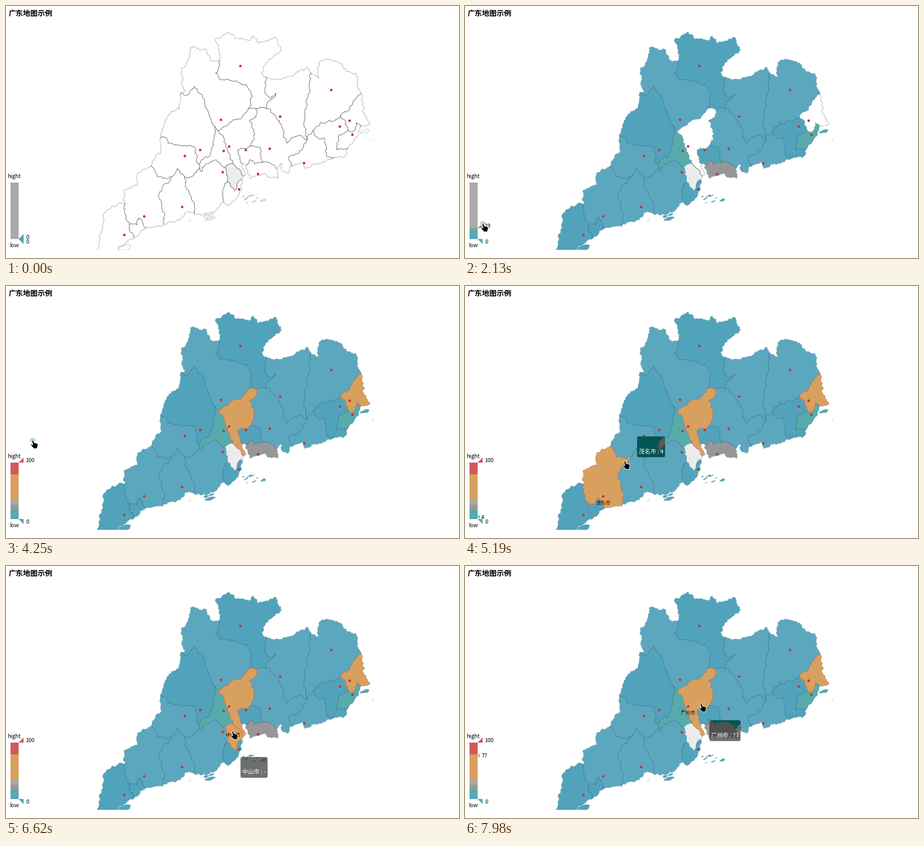
These frames come from a looping animation (1003 px wide and 558 px high, 8 s). A matplotlib script:

```python
import math
import numpy as np
import matplotlib.pyplot as plt
from matplotlib.animation import FuncAnimation
from matplotlib.patches import Circle, FancyBboxPatch, PathPatch, Polygon, Rectangle
from matplotlib.path import Path

W, H, DPI = 1003, 558, 64
PX = 72 / DPI
STEP, LOOP = 40, 8000
FONT = "Noto Sans CJK JP"
BAR_X, BAR_W, BAR_TOP, BAR_LOW = 10, 18, 391, 516
TIP_LAG = 150

# upper limit of each colour band on the 0-100 scale
BANDS = [(3, "#50a3bb"), (5, "#5ba7be"), (16, "#57abab"), (25, "#979797"),
         (34, "#a8a8a8"), (79, "#d8a05e"), (101, "#d05a5a")]
ORANGE, BLANK = "#d8a05e", "#ececec"

# code: name, value, dot x, dot y
CITIES = {
    "Sg": ("韶关市", 2, 519, 133), "Qy": ("清远市", 4, 476, 252),
    "Hy": ("河源市", 4, 607, 245), "Mz": ("梅州市", 4, 720, 186),
    "Cz": ("潮州市", 62, 761, 254), "Jy": ("揭阳市", 2, 739, 267),
    "St": ("汕头市", 12, 767, 285), "Sw": ("汕尾市", 4, 660, 348),
    "Hz": ("惠州市", 4, 584, 316), "Sz": ("深圳市", 17, 558, 372),
    "Dg": ("东莞市", 2, 531, 319), "Gz": ("广州市", 77, 494, 311),
    "Fs": ("佛山市", 12, 482, 321), "Zq": ("肇庆市", 2, 430, 319),
    "Yf": ("云浮市", 4, 396, 332), "Jm": ("江门市", 4, 480, 368),
    "Zs": ("中山市", None, 503, 360), "Zh": ("珠海市", 2, 516, 406),
    "Yj": ("阳江市", 3, 390, 445), "Mm": ("茂名市", 4, 306, 466),
    "Zj": ("湛江市", 2, 262, 507),
}

# points where borders meet
NODES = dict(
    A=(472, 121), B=(575, 157), C=(577, 227), D=(555, 227), E=(536, 228), F=(386, 193),
    G=(462, 267), H=(470, 276), I=(342, 291), J=(426, 350), K=(428, 358), L=(485, 358),
    M=(502, 349), N=(526, 376), O=(524, 350), P=(532, 352), Q=(541, 310), R=(567, 347),
    S=(599, 361), T=(632, 355), U=(666, 296), V=(675, 148), X=(680, 276), Y=(727, 336),
    Z=(740, 244), a=(786, 194), b=(784, 268), c=(757, 276), d=(757, 315), e=(321, 355),
    f=(367, 378), g=(395, 379), h=(349, 484), i=(418, 461), j=(481, 434), k=(490, 388),
    l=(515, 388), m=(264, 437), o=(311, 491))

rng = np.random.default_rng(7)
arcs = []


def rough(pts):
    """Roughen straight runs by midpoint displacement of limited size."""
    out = [np.array(pts[0], float)]

    def split(a, b):
        d = b - a
        size = math.hypot(*d)
        if size < 3:
            out.append(b)
            return
        shift = rng.uniform(-0.28, 0.28) * min(size, 10) / size
        m = (a + b) / 2 + shift * np.array([-d[1], d[0]])
        split(a, m)
        split(m, b)

    for a, b in zip(pts[:-1], pts[1:]):
        split(np.array(a, float), np.array(b, float))
    return np.array(out)


def arc(codes, ends, *via):
    """Border of one or two cities between two nodes, through a few points."""
    start, end = (NODES[n] for n in ends)
    arcs.append((codes.split(), rough([start, *zip(via[::2], via[1::2]), end])))


# north
arc("Sg", "AB", 470, 90, 463, 78, 492, 58, 510, 73, 540, 77, 548, 66, 557, 82, 598, 69,
    610, 98, 586, 117, 566, 147)
arc("Sg Hy", "BC", 573, 193, 586, 204, 596, 193, 580, 212)
arc("Sg Hz", "CD")
arc("Sg Gz", "DE")
arc("Sg Qy", "EA", 545, 198, 533, 174, 472, 162, 464, 148)
arc("Qy", "AF", 456, 123, 445, 97, 407, 93, 403, 122, 387, 149, 397, 187)
arc("Qy Zq", "FG", 402, 196, 417, 178, 435, 202, 447, 232)
arc("Qy Fs", "GH")
arc("Qy Gz", "HE", 494, 258, 522, 248)
arc("Hy", "BV", 593, 164, 628, 156, 668, 135)
arc("Hy Mz", "VU", 672, 190, 660, 243)
arc("Hy Hz", "CU", 606, 254, 614, 290, 622, 304, 632, 292, 655, 288)

# east
arc("Mz", "Va", 692, 160, 692, 126, 705, 120, 741, 126, 757, 146, 774, 148)
arc("Mz Cz", "aZ", 768, 212, 757, 232)
arc("Mz Jy", "ZX", 720, 255, 697, 257)
arc("Mz Sw", "UX")
arc("Cz", "ab", 791, 236, 805, 262)
arc("Cz Jy", "Zc", 752, 256)
arc("Cz St", "cb", 765, 279, 776, 258)
arc("Jy St", "cd", 738, 285, 731, 317, 746, 318)
arc("St", "db", 780, 287)
arc("Jy", "Yd", 755, 328)
arc("Jy Sw", "XY", 689, 292, 705, 293, 709, 330)
arc("Sw", "TY", 659, 346, 662, 360, 677, 350, 706, 345)
arc("Sw Hz", "TU", 626, 336, 650, 320)

# delta
arc("Hz Gz", "DQ", 555, 240, 539, 254, 551, 283)
arc("Hz Dg", "QR", 564, 314)
arc("Hz Sz", "RS", 583, 346)
arc("Hz", "ST", 609, 348, 612, 366, 625, 370)
arc("Gz Dg", "QO", 514, 318)
arc("Gz", "ON", 531, 374)
arc("Gz Zs", "MN", 517, 362)
arc("Gz Fs", "HM", 484, 296)
arc("Dg", "OP")
arc("Dg Sz", "PR", 541, 340, 550, 350)
arc("Sz", "PS", 541, 382, 571, 371, 601, 382)
arc("Fs Zs", "LM", 490, 351)
arc("Fs Zq", "GJ", 459, 300, 452, 329)
arc("Fs Yf", "JK")
arc("Fs Jm", "KL", 432, 367, 434, 357, 465, 341)
arc("Zs", "Nl")
arc("Zs Zh", "kl", 506, 409)
arc("Zs Jm", "Lk")
arc("Zh Jm", "kj", 480, 415)
arc("Zh", "lj", 524, 385, 515, 421, 491, 442)

# west
arc("Zq", "FI", 385, 228, 363, 238, 346, 275)
arc("Zq Yf", "IJ", 356, 293, 358, 303, 416, 311)
arc("Yf", "Ie", 344, 322)
arc("Yf Mm", "ef", 335, 378, 353, 381)
arc("Yf Yj", "fg", 379, 359)
arc("Yf Jm", "gK", 404, 381)
arc("Yj Jm", "gi", 400, 406, 418, 440)
arc("Yj Mm", "fh", 339, 414, 346, 450)
arc("Yj", "hi", 386, 474, 400, 457)
arc("Jm", "ij", 438, 460, 460, 457)
arc("Mm", "em", 292, 369, 290, 397, 261, 411)
arc("Mm Zj", "mo", 266, 465, 273, 484, 290, 485, 294, 469)
arc("Mm", "ho")
arc("Zj", "om", 284, 513, 250, 532, 247, 548, 205, 548, 215, 490, 214, 467, 235, 443)


def ring(code):
    """Chain the arcs that touch one city into a closed outline."""
    parts = [p for codes, p in arcs if code in codes]
    line = parts.pop(0)
    while parts:
        _, i, k = min((math.dist(line[-1], p[k]), i, k) for i, p in enumerate(parts) for k in (0, -1))
        p = parts.pop(i)
        line = np.vstack([line, (p if k == 0 else p[::-1])[1:]])
    return Path(np.vstack([line, line[:1]]))


def isles(code, count, cx, cy, spread, size):
    """A loose group of small ragged islands."""
    for _ in range(count):
        a = np.linspace(0, 2 * math.pi, 12, endpoint=False)
        r = rng.uniform(0.6, 1.2, 12) * size * rng.uniform(0.5, 1.1)
        x, y = (cx, cy) + rng.uniform(-spread, spread, 2) * (1, 0.6)
        shape = np.column_stack([x + 1.5 * r * np.cos(a), y + 0.7 * r * np.sin(a - 0.5)])
        yield code, shape


ISLES = [*isles("Zj", 1, 265, 534, 0, 12), *isles("St", 1, 794, 278, 0, 6),
         *isles("St", 1, 813, 297, 0, 0.6), *isles("Jm", 7, 449, 467, 11, 4),
         *isles("Jm", 2, 407, 475, 4, 1), *isles("Zh", 12, 541, 427, 16, 2),
         *isles("Zh", 3, 569, 430, 6, 3)]

fig = plt.figure(figsize=(W / DPI, H / DPI), dpi=DPI, facecolor="white")
ax = fig.add_axes([0, 0, 1, 1])
ax.set(xlim=(0, W), ylim=(H, 0))
ax.axis("off")
stage = Rectangle((0, 0), W, 540, transform=ax.transData)


def add(patch, z):
    patch.set_zorder(z)
    return ax.add_patch(patch)


def text(x, y, s, size, z=6, **kw):
    return ax.text(x, y, s, fontsize=size * PX, family=FONT, zorder=z,
                   **{"va": "center", "color": "black", **kw})


# map
paths = {c: ring(c) for c in CITIES}
fills = {c: add(PathPatch(p, lw=0), 1) for c, p in paths.items()}
islands = [(c, add(Polygon(p, closed=True, lw=0.6 * PX), 3)) for c, p in ISLES]
lines = [(codes, ax.plot(*p.T, zorder=2)[0]) for codes, p in arcs]
creek = rough([(273, 484), (275, 501), (284, 513)])
lines.append((["Mm", "Zj"], ax.plot(*creek.T, zorder=2)[0]))
for art in [*fills.values(), *(p for _, p in islands), *(ln for _, ln in lines)]:
    art.set_clip_path(stage)
for _, value, x, y in CITIES.values():
    if value is not None:
        add(Circle((x, y), 2.8, color="#c23531", lw=0), 4)
city_label = text(0, 0, "", 11, 5, ha="center", color="#2a0800")

# title and value bar
text(6, 17, "广东地图示例", 16.3, weight="bold")
text(19, 378, "hight", 12, ha="center")
text(19, 531, "low", 12, ha="center")


def bar_y(v):
    return BAR_LOW - (BAR_LOW - BAR_TOP) * v / 100


low = 0
for top, colour in BANDS:
    top = min(top, 100)
    add(Rectangle((BAR_X, bar_y(top)), BAR_W, bar_y(low) - bar_y(top), color=colour, lw=0), 3)
    low = top
cover = add(Rectangle((BAR_X, BAR_TOP), BAR_W, 0, color="#aaaaaa", lw=0), 4)
add(Polygon([(28, 516), (39, 516), (39, 527)], color="#50a3bb", lw=0), 4)
text(44, 523, "0", 12)
handle = add(Polygon([(0, 0)] * 3, lw=0), 4)
handle_text = text(44, 0, "", 12)
mark = add(Polygon([(0, 0)] * 3, lw=0), 4)
mark_text = text(36, 0, "", 12)

# tooltip, with darker tones where it lies over coloured land
tip = add(FancyBboxPatch((0, 0), 62, 46, boxstyle="round,pad=0,rounding_size=4",
                         fc="#323232", alpha=0.7, lw=0), 8)
blue = [c for c, city in CITIES.items() if city[1] is not None and city[1] < 5]
tints = []
for shade, group in [("#005555", blue), ("#5e5757", ["Fs"]), ("#505050", ["Sz"])]:
    shape = Path.make_compound_path(*(paths[c] for c in group))
    tints.append(add(PathPatch(shape, color=shade, lw=0), 9))
tip_text = text(0, 0, "", 12.8, 10, color="white")

# pointers
HAND = np.array([(-2, 1), (-0.5, -0.8), (1.2, 0.2), (2.8, 5), (9.5, 6.5), (11.5, 9),
                 (9.5, 18), (2, 18), (-5, 9.5), (-3.5, 8), (0.2, 10)])
spoke = np.array([(-1, -1), (-1, -5), (-3.6, -5), (0, -9.5), (3.6, -5), (1, -5)])
turns = [np.array([[c, s], [-s, c]]) for c, s in [(1, 0), (0, 1), (-1, 0), (0, -1)]]
MOVE = np.vstack([spoke @ m for m in turns])
press = add(Circle((0, 0), 6, color="#a9d7ea", lw=0), 11)
pointer = add(Polygon(HAND, fc="black", ec="white", lw=1.1 * PX, joinstyle="round"), 12)

# time, x, y: drag up the bar, then wander over the map
ROUTE = np.array([
    (1090, 37, 511), (1350, 37, 507), (1980, 39, 487), (2150, 40, 482), (2780, 45, 466),
    (3350, 54, 408), (3640, 57, 391), (4450, 60, 328), (4840, 59, 331), (4950, 340, 150),
    (5040, 361, 313), (5190, 354, 388), (5630, 388, 425), (6470, 499, 406), (6600, 502, 366),
    (7000, 503, 366), (7830, 521, 323), (7960, 523, 305)])


def pointer_at(t):
    return tuple(float(np.interp(t, ROUTE[:, 0], ROUTE[:, i])) for i in (1, 2))


def tone(v):
    return next(c for top, c in BANDS if v < top)


def fill_of(code, value, over):
    v = CITIES[code][1]
    if code == over:
        return ORANGE
    if v is None:
        return BLANK
    return tone(v) if v <= value else "white"


def style_line(line, inner, colours):
    lit = [c not in ("white", BLANK) for c in colours]
    if ORANGE in colours:
        look = ("#b5665c" if inner else "#c08a70", 0.9, "-")
    elif all(lit) and inner:
        look = ("#2c4f78", 0.9, (0, (2.5, 1.2)))
    elif any(lit):
        look = ("#78a3b0", 0.8, "-")
    else:
        look = ("#4c4c4c" if inner else "#959595", 0.9 if inner else 0.8, "-")
    line.set(color=look[0], linewidth=look[1] * PX, linestyle=look[2])


def draw_bar(value, v):
    hy = bar_y(value)
    cover.set_height(hy - BAR_TOP)
    handle.set_xy([(28, hy), (39, hy), (39, hy - 11)])
    handle.set_facecolor(tone(value))
    handle_text.set_text(str(round(value)))
    handle_text.set_y(hy - 4)
    mark.set_visible(v is not None)
    mark_text.set_visible(v is not None)
    if v is not None:
        my = bar_y(v)
        mark.set_xy([(28, my), (32.5, my - 4.5), (32.5, my + 4.5)])
        mark.set_facecolor("#e0906a" if v > 34 else tone(v))
        mark_text.set_text(str(v))
        mark_text.set_y(my + 1)


def draw_tip(over, t):
    for art in (city_label, tip, tip_text, *tints):
        art.set_visible(over is not None)
    if over is None:
        return
    name, v, cx, cy = CITIES[over]
    city_label.set_text(name)
    city_label.set_position((cx, cy + 15))
    x, y = pointer_at(t - TIP_LAG)
    x, y = x + 20, y + 20
    shown = "-" if v is None else str(v)
    tip.set_bounds(x, y, 60 if v is None else 55 + 7 * len(shown), 46)
    tip_text.set_text(f"{name} : {shown}")
    tip_text.set_position((x + 4, y + 34))
    for patch in tints:
        patch.set_clip_path(tip)


def draw(n):
    t = n * STEP + 30
    x, y = pointer_at(t)
    value, over = 100, None
    if t < 4840:
        value = min(max((507 - y) / 1.29, 0), 100)
    else:
        over = next((c for c, p in paths.items() if p.contains_point((x, y))), None)

    colours = {c: fill_of(c, value, over) for c in CITIES}
    for code, patch in fills.items():
        patch.set_facecolor(colours[code])
    for code, patch in islands:
        patch.set_facecolor(colours[code])
        patch.set_edgecolor("#999999" if colours[code] == "white" else "#5f9fb0")
    for codes, line in lines:
        style_line(line, len(codes) == 2, [colours[c] for c in codes])

    draw_bar(value, CITIES[over][1] if over else None)
    draw_tip(over, t)
    moving = t < 1400
    pointer.set_visible(t >= 650)
    pointer.set_xy((MOVE if moving else HAND) + (x, y))
    press.set_visible(1090 <= t < 4480)
    press.center = (x, y)
    return []


anim = FuncAnimation(fig, draw, frames=LOOP // STEP, interval=STEP, repeat=True,
                     repeat_delay=0, blit=False)
plt.show()
```
